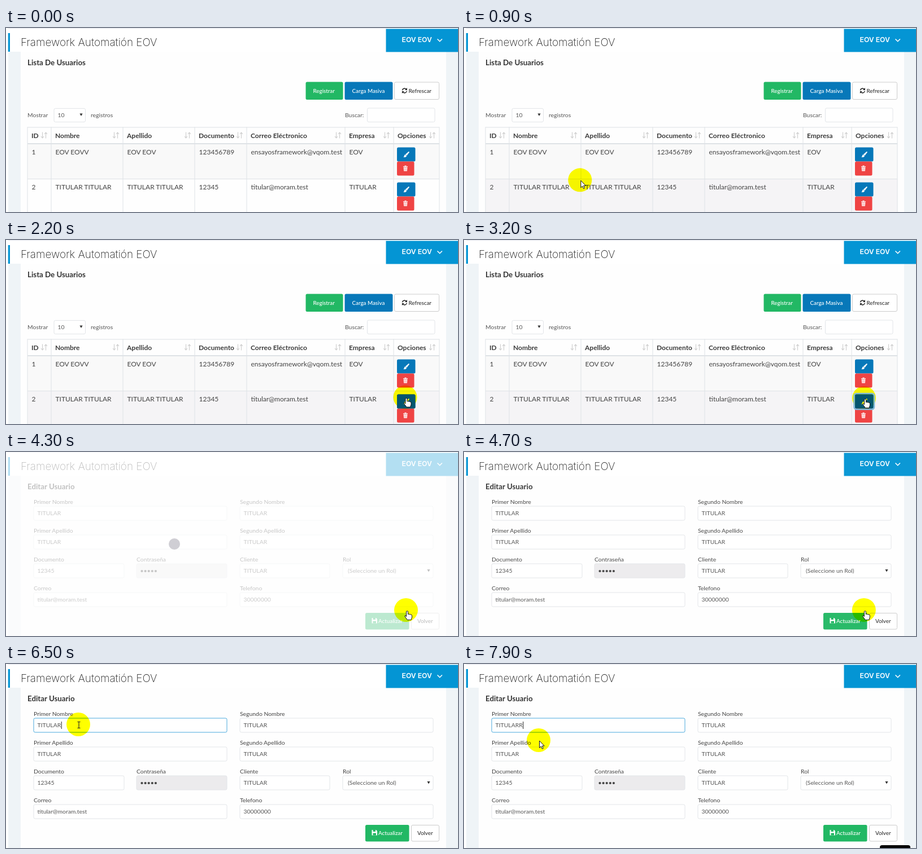
An HTML page for the animation above (8 s loop, 800 by 326 pixels).

```html
<!DOCTYPE html>
<html lang="es">
<head>
<meta charset="utf-8">
<title>Usuarios</title>
<style>
  html, body { margin: 0; width: 100%; height: 100%; overflow: hidden; background: #fff; }
  svg { display: block; width: 800px; height: 326px; }
  text { font: 10.4px Lato, sans-serif; fill: #555; white-space: pre; }
  .brand { font: 200 18.9px Inter, sans-serif; fill: #222; }
  .account { font: 600 12.2px Inter, sans-serif; fill: #fff; }
  .title { font-size: 13.3px; font-weight: 700; fill: #333; }
  .th { font-size: 12px; font-weight: 700; fill: #3c3c3c; }
  .td { font-size: 12px; fill: #444; }
  .label { fill: #444; }
  .btn { font-size: 9.8px; font-weight: 500; fill: #fff; }
  .dark { fill: #333; }
</style>
</head>
<body>
<svg id="stage" viewBox="0 0 800 326"></svg>
<script>
const NS = 'http://www.w3.org/2000/svg';
const LOOP = 8000;
const BLUE = '#0495d4', NAVY = '#0778b9', GREEN = '#22b864', RED = '#ef4444';
const LINE = '#dee2e6', FIELD = '#e2e5e8';
const stage = document.getElementById('stage');

function add(parent, tag, attrs = {}) {
  const el = document.createElementNS(NS, tag);
  for (const key in attrs) el.setAttribute(key, attrs[key]);
  return parent.appendChild(el);
}
const group = parent => add(parent, 'g');
const path = (parent, d, attrs) => add(parent, 'path', { d, ...attrs });
const rect = (parent, x, y, width, height, fill, attrs) =>
  add(parent, 'rect', { x, y, width, height, fill, ...attrs });
const button = (parent, x, y, w, h, fill) => rect(parent, x, y, w, h, fill, { rx: 2.5 });
function text(parent, x, y, content, cls = '') {
  const el = add(parent, 'text', { x, y, class: cls });
  el.textContent = content;
  return el;
}
const outlined = (parent, x, y, w, h, stroke, fill = '#fff') =>
  rect(parent, x + .5, y + .5, w - 1, h - 1, fill, { stroke, rx: 2.5 });
const caretDown = (parent, x, y) => path(parent, `M${x - 2.6} ${y - 2}h5.2l-2.6 4.4z`, { fill: '#333' });

// Page frame
rect(stage, 4, 42, 796, 284, '#eff4f7');
rect(stage, 26, 42, 753, 284, '#fefefe');
rect(stage, 4, 0, 669, 1, '#e6e8ee');
rect(stage, 3.7, 9, 3.3, 33, BLUE);
text(stage, 26, 31.5, 'Framework Automatión EOV', 'brand');
rect(stage, 672.5, 1.5, 127.5, 41, BLUE);
text(stage, 700.5, 25, 'EOV EOV', 'account');
path(stage, 'M763.500 19.500l4.200 4.200 4.200-4.200', { fill: 'none', stroke: '#fff', 'stroke-width': 1.6 });

const list = group(stage), form = group(stage);

// User list
text(list, 38, 66, 'Lista De Usuarios', 'title');
button(list, 530.5, 95.5, 66, 31.5, GREEN);
text(list, 543.5, 114.7, 'Registrar', 'btn');
button(list, 599.5, 95.5, 85, 31.5, NAVY);
text(list, 612.5, 114.7, 'Carga Masiva', 'btn');
outlined(list, 687, 95.5, 80, 31.5, '#ccc');
path(list, 'M701.4 110.5a4 4 0 0 1 7-2M709.4 111.5a4 4 0 0 1-7 2',
  { fill: 'none', stroke: '#222', 'stroke-width': 1.4 });
path(list, 'M709.9 106v4h-4zM700.9 116v-4h4z', { fill: '#222' });
text(list, 712.5, 114.7, 'Refrescar', 'btn dark');
text(list, 38, 158, 'Mostrar');
outlined(list, 84.5, 142, 56.5, 25, FIELD);
text(list, 91.5, 158, '10');
caretDown(list, 133, 153.5);
text(list, 150, 158, 'registros');
text(list, 600, 158, 'Buscar:');
outlined(list, 639, 141.5, 120.5, 25.5, FIELD);

const columns = [38, 80, 207, 334, 426, 600, 686, 767];
const heads = ['ID', 'Nombre', 'Apellido', 'Documento', 'Correo Eléctronico', 'Empresa', 'Opciones'];
const users = [
  ['1', 'EOV EOVV', 'EOV EOV', '123456789', 'ensayosframework@vqom.test', 'EOV'],
  ['2', 'TITULAR TITULAR', 'TITULAR TITULAR', '12345', 'titular@moram.test', 'TITULAR']
];
const rows = [
  rect(list, 38, 205, 729, 62, '#f9f9f9'),
  rect(list, 38, 267, 729, 59, '#fefefe')
];
[[175.5, 1], [204, 2], [267, 1]].forEach(([y, h]) => rect(list, 38, y, 729, h, LINE));
columns.forEach(x => rect(list, x - .5, 175.5, 1, 151, LINE));
heads.forEach((head, i) => {
  text(list, columns[i] + 7, 194.700, head, 'th');
  const x = columns[i + 1] - 12.5;
  path(list, `M${x - 3} 184.5v10m-2.5-2.5l2.5 3 2.5-3M${x + 3} 195.5v-10m-2.5 2.5l2.5-3 2.5 3`,
    { fill: 'none', stroke: '#ccc', 'stroke-width': 1.1 });
});

function brush(parent, y, fill) {
  path(parent, `M712.8 ${y - 5.3}l1.200 1.200-4.600 6.200-2.600-2z`, { fill });
  path(parent, `M706.3 ${y + .2}l2.800 2.200q-1 3.200-6 2.600q1.800-.8 1.700-2.500q.3-1.900 1.500-2.300z`, { fill });
}
function trash(parent, y) {
  path(parent, `M703 ${y - 4}h8v1.200h-8zM705.5 ${y - 5.200}h3v1.200h-3zM703.700 ${y - 2}h6.600l-.5 6.500h-5.600z`,
    { fill: '#fff' });
  path(parent, `M705.8 ${y - 1}v4.5m2.4-4.500v4.500`, { stroke: RED, 'stroke-width': .7 });
}
users.forEach((user, r) => {
  const top = 211.5 + r * 62;
  user.forEach((cell, i) => text(list, columns[i] + 7.5, top + 12.5, cell, 'td'));
  button(list, 692, top, 32.5, 25, NAVY);
  brush(list, top + 12.5, '#fff');
  button(list, 692, top + 25, 30.5, 25, RED);
  trash(list, top + 37.5);
});

// Edit form
text(form, 38, 66, 'Editar Usuario', 'title');
function field(x, y, w, label, value, fill) {
  text(form, x, y - 4, label, 'label');
  const box = outlined(form, x - .5, y - .5, w + 1, 26, FIELD, fill);
  return { box, value: text(form, x + 6.5, y + 16.2, value) };
}
const first = field(49, 96, 342, 'Primer Nombre', 'TITULAR');
field(414, 96, 342, 'Segundo Nombre', 'TITULAR');
field(49, 147, 342, 'Primer Apellido', 'TITULAR');
field(414, 147, 342, 'Segundo Apellido', 'TITULAR');
field(49, 198, 160, 'Documento', '12345');
field(231, 198, 160, 'Contraseña', '', '#ecebed');
for (let i = 0; i < 5; i++) add(form, 'circle', { cx: 240.5 + i * 6.1, cy: 211, r: 2.1, fill: '#444' });
field(414, 198, 159, 'Cliente', 'TITULAR');
field(596, 198, 160, 'Rol', '');
text(form, 605, 214.2, '(Seleccione un Rol)');
caretDown(form, 748, 210);
field(49, 249, 342, 'Correo', 'titular@moram.test');
field(414, 249, 342, 'Telefono', '30000000');
button(form, 636, 285, 77.5, 29.5, GREEN);
path(form, 'M647.5 294h7.5l2 2v7.5h-9.5z', { fill: '#fff' });
path(form, 'M649.5 294h4.5v3h-4.5zM649.5 299.5h5.5v4h-5.5z', { fill: GREEN });
text(form, 659, 303, 'Actualizar', 'btn');
outlined(form, 717, 285, 50, 29.5, '#ccc');
text(form, 728, 303, 'Volver', 'btn dark');
const caret = rect(form, 0, 102, 1, 13, '#222');
const keyBox = rect(form, 736, 321, 54, 20, '#000', { rx: 4 });

// Loading veil and pointer
const veil = rect(stage, 0, 0, 800, 326, '#fff');
const loader = add(stage, 'circle', { cx: 298, cy: 163, fill: '#cfced4' });
const halo = add(stage, 'circle', { r: 21, fill: '#ff0', style: 'mix-blend-mode:multiply' });
const hover = group(stage);
const ring = rect(hover, 690.5, 272, 35.5, 28, 'none', { rx: 4, stroke: '#7fb9da', 'stroke-width': 2.5 });
button(hover, 692, 273.5, 32.5, 25, '#04566f');
brush(hover, 286, '#ff0');

const pointer = group(stage);
const ink = { fill: '#fff', stroke: '#111', 'stroke-width': 1, 'stroke-linejoin': 'round' };
const shapes = {
  arrow: path(pointer, 'M.5 0v12.5l2.8-2.7 2 4.5 2-.9-2-4.3h3.9z', ink),
  hand: path(pointer, 'M-.5 1.5q1.5-1.6 3 0v5q1.300-.9 2.400.2q1.400-.7 2.300.4q2.200-.2 2.300 1.700v3.200l-1.500 4.500h-6.500l-4.500-6q-.6-2 1-1.600l1.500 1.600z', ink),
  beam: path(pointer, 'M-2.5-5.5h2l.5.5.5-.5h2M0-5v10M-2.5 5.5h2l.5-.5.5.5h2',
    { fill: 'none', stroke: '#222', 'stroke-width': 1.1 })
};

// [time, x, y]
const track = [
  [800, 180, 338], [900, 205, 270], [1000, 235, 200], [1100, 268, 152], [1200, 308, 137],
  [1300, 360, 148], [1400, 403, 156], [1500, 480, 168], [1600, 555, 188], [1700, 610, 208],
  [1800, 650, 230], [1900, 682, 254], [2000, 699, 270], [2100, 705, 276], [2200, 706.5, 278.5],
  [2400, 708, 280],
  [4700, 708, 280], [4800, 690, 272], [4900, 635, 254], [5000, 560, 234], [5100, 475, 213],
  [5200, 395, 193], [5300, 330, 177], [5400, 288, 167], [5500, 265, 162], [5600, 258, 161],
  [5700, 254, 160], [5800, 238, 152], [5900, 210, 138], [6000, 178, 124], [6100, 152, 114],
  [6200, 136, 109], [6300, 128, 107], [7800, 128, 107], [7900, 132, 135]
];
// [time, opacity]
const veilSteps = [[3800, 0], [3900, .3], [4000, .7], [4100, .95], [4200, .92], [4300, .7],
  [4400, .45], [4500, .25], [4600, .1], [4700, .03], [4800, 0]];
const kinds = [[0, 'arrow'], [2050, 'hand'], [4780, 'arrow'], [5350, 'beam'], [5850, 'arrow'],
  [6050, 'beam'], [7850, 'arrow']];

function at(table, t, col = 1) {
  const i = table.findIndex(row => row[0] > t);
  if (i < 0) return table[table.length - 1][col];
  if (i === 0) return table[0][col];
  const a = table[i - 1], b = table[i];
  return a[col] + (b[col] - a[col]) * (t - a[0]) / (b[0] - a[0]);
}
const show = (el, on) => el.setAttribute('visibility', on ? 'inherit' : 'hidden');

function render(t) {
  const x = at(track, t, 1), y = at(track, t, 2);
  const active = t >= 800, editing = t >= 4150;
  show(list, !editing);
  show(form, editing);

  const over = active && x > 38 && x < 767;
  rows[0].setAttribute('fill', over && y >= 205 && y < 267 ? '#f4f3f4' : '#f9f9f9');
  rows[1].setAttribute('fill', over && y >= 267 ? '#f5f4f6' : '#fefefe');

  const cover = at(veilSteps, t);
  veil.setAttribute('opacity', cover);
  show(loader, t >= 3950 && t < 4450);
  loader.setAttribute('r', 7 + 3 * Math.cos((t - 4300) / 400 * Math.PI));

  show(hover, t >= 2050 && !editing);
  hover.setAttribute('opacity', 1 - cover);
  show(ring, t >= 2900 && !editing);

  first.box.setAttribute('stroke', t >= 6400 ? '#4aa9dd' : FIELD);
  const value = t >= 7400 ? 'TITULARR' : 'TITULAR';
  if (first.value.textContent !== value) first.value.textContent = value;
  show(caret, t >= 6400);
  if (editing) caret.setAttribute('x', 56 + first.value.getComputedTextLength());
  show(keyBox, t >= 6600);

  show(halo, active);
  halo.setAttribute('cx', x);
  halo.setAttribute('cy', y);
  const kind = kinds.filter(k => k[0] <= t).pop()[1];
  for (const name in shapes) show(shapes[name], active && name === kind);
  pointer.setAttribute('transform', `translate(${x + 1} ${y + 1})`);
}

const start = performance.now();
function tick() {
  render((performance.now() - start) % LOOP);
  requestAnimationFrame(tick);
}
tick();
</script>
</body>
</html>
```
